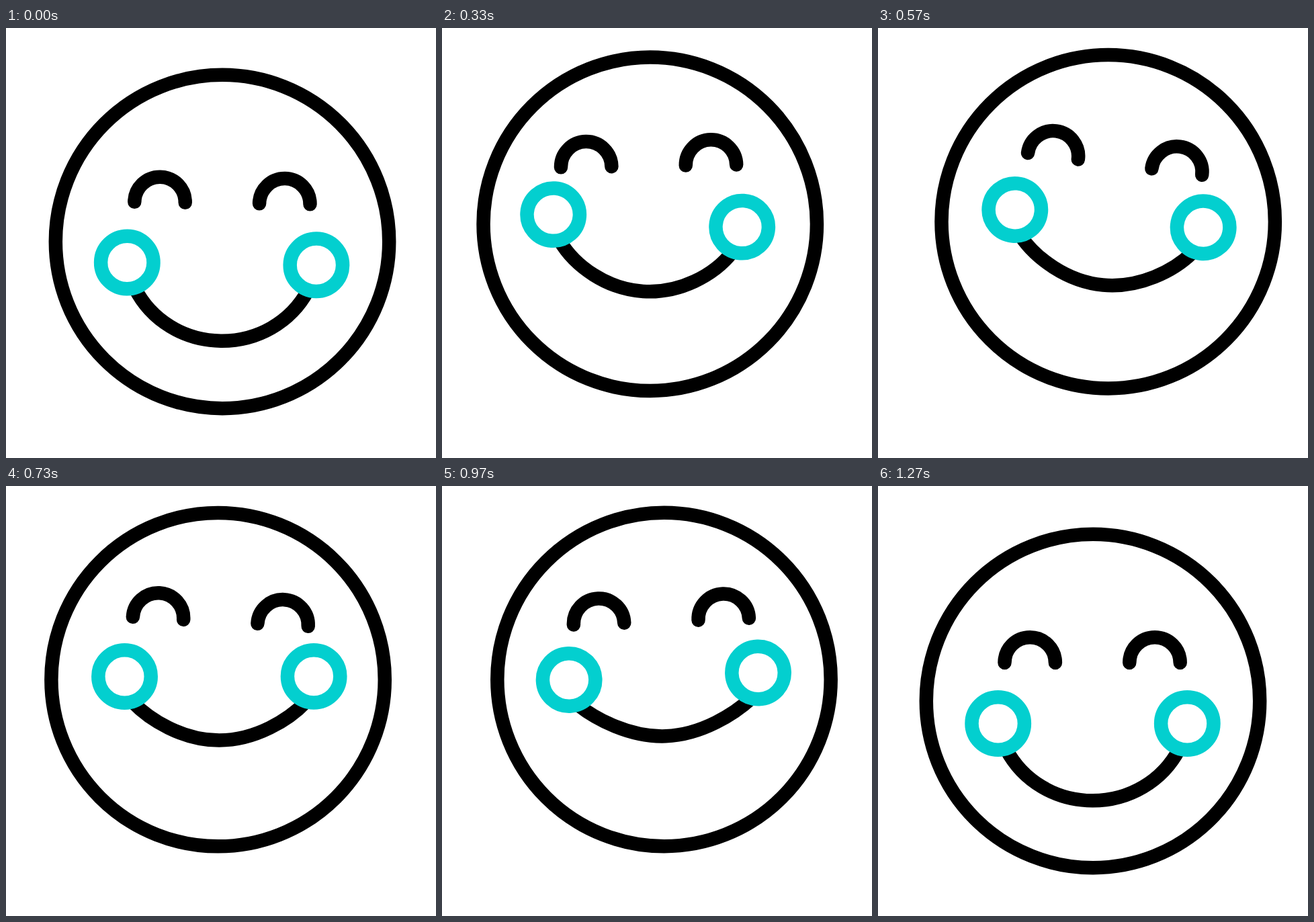
These frames come from a looping animation (640x640 px, 1670 ms). An HTML page:

```html
<!DOCTYPE html>
<html lang="en">
<head>
<meta charset="utf-8">
<title>Swaying smile</title>
<style>
  html, body { margin: 0; width: 100%; height: 100%; overflow: hidden; background: #fff; }
  svg { display: block; width: 100vw; height: 100vh; }
  g, path, circle { fill: none; stroke-width: 20.5; stroke-linecap: round; }
  .ink { stroke: #000; }
  .blush { stroke: #03cfcf; }
</style>
</head>
<body>
<svg viewBox="0 0 640 640">
  <circle id="head" class="ink" r="248.2"/>
  <g id="eyes" class="ink">
    <path d="M-130.7 0a37.7 37.7 0 0 1 75.4 0"/>
    <path d="M55.1 0a37.7 37.7 0 0 1 75.4 0"/>
  </g>
  <g id="lower">
    <path id="mouth" class="ink"/>
    <g id="cheeks" class="blush">
      <circle cx="-140.8" r="39.2"/>
      <circle cx="140.8" r="39.2"/>
    </g>
  </g>
</svg>
<script>
const LOOP = 1670;

// Cosine easing from one [step, value] turning point to the next.
const swing = (...turns) => n => {
  const next = turns.findIndex(([step]) => step > n);
  if (next < 1) return turns.at(next)[1];
  const [t0, v0] = turns[next - 1], [t1, v1] = turns[next];
  return v0 + (v1 - v0) * (1 - Math.cos(Math.PI * (n - t0) / (t1 - t0))) / 2;
};

const headX = swing([-1.5, 320], [6.2, 342.3], [13, 287.3], [18.3, 351.8], [24.7, 293.5], [32, 351.5], [38, 320]);
const headY = swing([-1.2, 320], [5.6, 293.2], [18, 288.2], [30.2, 288], [38, 320]);
const tilt = swing([-1, 0], [5.5, 13.4], [13.4, -10], [18.4, 11], [26.7, -9], [32.3, 10], [38, 0]);
const mouthTilt = swing([4, 0], [10, 4.6], [20, -3.5], [29, 0]);
const lift = swing([-0.5, 0], [6, 1], [30.5, 1], [38, 0]);

const el = id => document.getElementById(id);
const head = el("head"), eyes = el("eyes"), lower = el("lower"), mouth = el("mouth"), cheeks = el("cheeks");
const place = (node, value) => node.setAttribute("transform", value);

function smile(top, bottom) {
  const x = 128.8, grip = 54;
  const bend = top + 48 * ((bottom - top) / 76.8) ** 2;
  return `M${-x} ${top}C${25 - x} ${bend} ${-grip} ${bottom} 0 ${bottom}`
    + `S${x - 25} ${bend} ${x} ${top}`;
}

function draw(n) {
  const up = lift(n);
  const cheekY = 33.5 - 38.3 * up;
  const chinY = 148.3 - up * (39.3 + 0.85 * n);
  const at = `translate(${headX(n)} ${headY(n)})`;
  const turned = `${at} rotate(${tilt(n)})`;
  place(head, at);
  place(eyes, `${turned} translate(-0.8 ${-57 - 29.4 * up})`);
  place(lower, `${turned} rotate(${mouthTilt(n)} 0 -42) translate(-0.5 0)`);
  place(cheeks, `translate(0 ${cheekY})`);
  mouth.setAttribute("d", smile(cheekY + 38, chinY));
}

// Thirty steps a second, on a 10 ms clock.
const stepAt = ms => Math.floor((Math.floor(ms / 10) + 0.5) * 0.3);

let start;
function tick() {
  const now = performance.now();
  start ??= now;
  draw(stepAt((now - start) % LOOP));
  requestAnimationFrame(tick);
}
draw(0);
requestAnimationFrame(tick);
</script>
</body>
</html>
```
